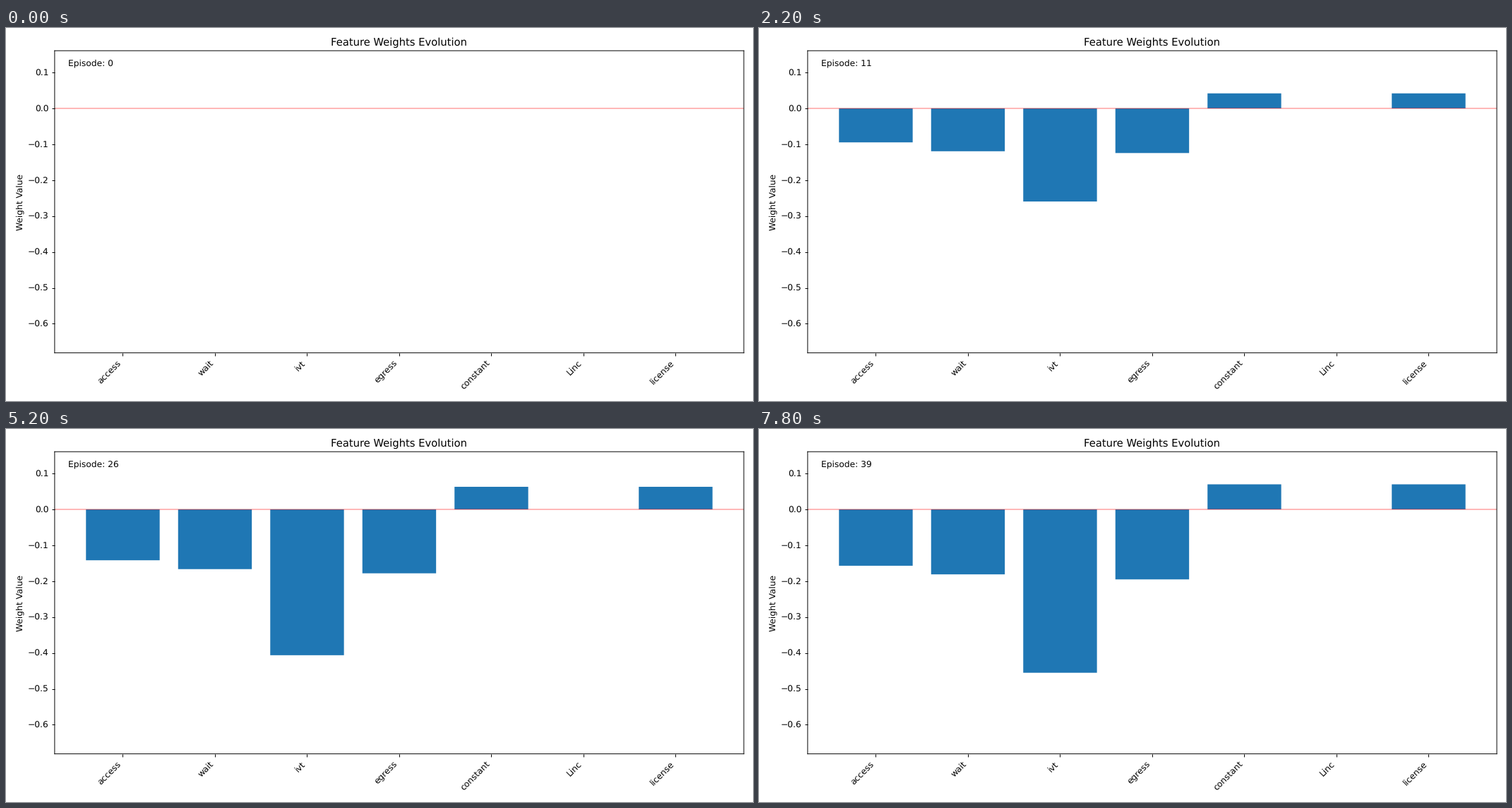
A matplotlib script that plays this animation: 1058 px wide and 529 px high, repeating every 8000 ms.

```python
import numpy as np
import matplotlib.pyplot as plt
from matplotlib.animation import FuncAnimation

W, H = 1058, 529
EPISODES = 40
STEP_MS = 200
FEATURES = ["access", "wait", "ivt", "egress", "constant", "Linc", "license"]

# Learning curve of the leading weight (ivt): episode, size.
CURVE = [(0, 0), (4, .128), (6, .176), (11, .2594), (16, .3219),
         (18, .3726), (21, .3867), (30, .4219), (39, .4551)]
FINAL = CURVE[-1][1]


def weights(episode):
    ivt = np.interp(episode, *zip(*CURVE))

    def follow(final, power):
        return final * (ivt / FINAL) ** power

    const = follow(.0698, .91)
    return [-follow(.157, .90), -follow(.181, .74), -ivt,
            -follow(.195, .80), const, 0, const]


# Soft edges and unhinted glyphs keep every part at its fractional position.
plt.rcParams.update({"font.family": "DejaVu Sans", "path.snap": False,
                     "text.hinting": "none"})
fig, ax = plt.subplots(figsize=(12, 6), dpi=W / 12)
fig.subplots_adjust(left=68.9 / W, right=1045 / W,
                    bottom=1 - 460.7 / H, top=1 - 32.2 / H)

bars = ax.bar(range(len(FEATURES)), np.zeros(len(FEATURES)), color="#1f77b4")
ax.axhline(0, color="red", alpha=0.3)
ax.set_xlim(-0.74, 6.74)
ax.set_ylim(-0.681, 0.1607)
ax.set_xticks(range(len(FEATURES)), FEATURES, rotation=45, ha="right")
ax.set_yticks(np.arange(-6, 2) / 10)
ax.set_ylabel("Weight Value")
ax.set_title("Feature Weights Evolution")
label = ax.text(0.02, 0.95, "", transform=ax.transAxes)


def update(episode):
    for bar, value in zip(bars, weights(episode)):
        bar.set_height(value)
    label.set_text(f"Episode: {episode}")
    return [*bars, label]


anim = FuncAnimation(fig, update, frames=EPISODES, interval=STEP_MS,
                     init_func=lambda: update(0), repeat=True, repeat_delay=0)
plt.show()
```
